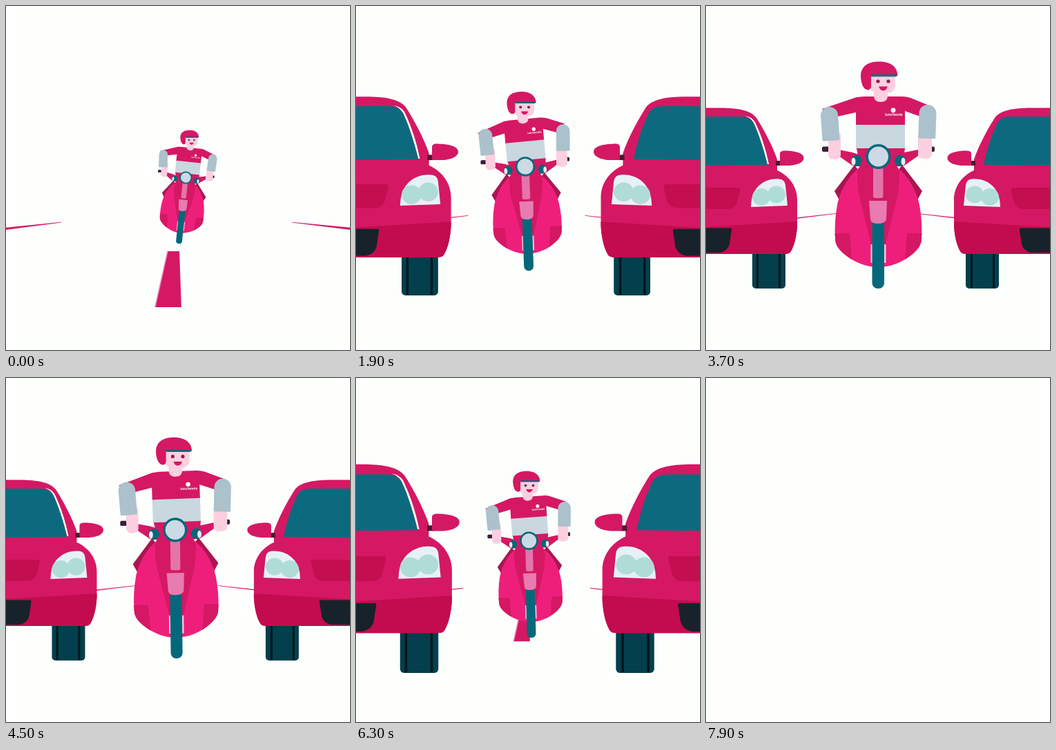
An HTML page with a canvas for the animation above (8 s loop, 498 px wide and 498 px high).

```html
<!DOCTYPE html>
<html lang="en">
<head>
<meta charset="utf-8">
<title>Scooter ride</title>
<style>
html, body { margin: 0; width: 100%; height: 100%; overflow: hidden; background: #fdfffc; }
canvas { display: block; width: 498px; height: 498px; }
</style>
</head>
<body>
<canvas id="stage" width="498" height="498"></canvas>
<script>
const ctx = document.getElementById('stage').getContext('2d');
const LOOP = 8000, STEP = 100, SPAN = 7860;
const PINK = '#d51863', HOT = '#ee1f7b', DEEP = '#c30c4f', TEAL = '#04687a', SKIN = '#fbcfe0';

// time, wheel x, wheel y, scale, tilt and rider's extra lean in degrees
const RIDE = [
  [0, 250, 344, .503, 6, 0],
  [1200, 258, 369, .7, 0, 0],
  [1560, 254, 376, .735, -1.6, -2.4],
  [2600, 244, 397, .902, -2.3, -3.4],
  [3700, 249, 409, 1, 0, 0],
  [3930, 250, 409, 1.004, .4, .4]
];
// time, left car x, right car x, y, scale
const CARS = [
  [300, -220, 720, 800, 1.9],
  [600, -45, 560, 640, 1.65],
  [900, 42, 472, 520, 1.4],
  [1200, 76.5, 432, 454, 1.245],
  [1560, 91.5, 404, 427, 1.155],
  [2600, 89.5, 400, 411, 1.015],
  [3700, 91, 400, 409, 1],
  [3930, 91, 400, 409, 1]
];
// time, reach of the road edge
const EDGE = [[0, 80], [1200, 147], [1560, 155], [2600, 177], [3700, 191], [3930, 194]];

// smooth curve through every column of the keys
function sample(keys, t) {
  const last = keys.length - 1;
  if (t <= keys[0][0]) return keys[0].slice(1);
  if (t >= keys[last][0]) return keys[last].slice(1);
  let i = 0;
  while (keys[i + 1][0] < t) i++;
  const a = keys[i], b = keys[i + 1], d = b[0] - a[0], u = (t - a[0]) / d;
  const slope = (k, c) => {
    const p = keys[Math.max(0, k - 1)], n = keys[Math.min(last, k + 1)];
    return (n[c] - p[c]) / (n[0] - p[0]);
  };
  return a.slice(1).map((v, j) => {
    const c = j + 1, w = 1 - u;
    return v * (1 + 2 * u) * w * w + b[c] * u * u * (3 - 2 * u)
      + d * u * w * (w * slope(i, c) - u * slope(i + 1, c));
  });
}

function shape(color, d) {
  ctx.fillStyle = color;
  ctx.fill(new Path2D(d));
}
function dot(color, x, y, rx, ry = rx) {
  ctx.fillStyle = color;
  ctx.beginPath();
  ctx.ellipse(x, y, rx, ry, 0, 0, 7);
  ctx.fill();
}
function box(color, x, y, w, h, r = 0) {
  ctx.fillStyle = color;
  ctx.beginPath();
  ctx.roundRect(x, y, w, h, r);
  ctx.fill();
}
function placed(x, y, sx, sy, deg, ox, oy, draw) {
  ctx.save();
  ctx.translate(x, y);
  ctx.rotate(deg * Math.PI / 180);
  ctx.scale(sx, sy);
  ctx.translate(-ox, -oy);
  draw();
  ctx.restore();
}
const turned = (x, y, deg, draw) => placed(x, y, 1, 1, deg, x, y, draw);
// draws a left half and its mirror image about the scooter's axis
function mirrored(draw) {
  for (const side of [1, -1]) placed(249.5, 0, side, 1, 0, 249.5, 0, draw);
}

function road(t) {
  const [tip] = sample(EDGE, t);
  const y = 322.5 - tip * .117;
  shape(PINK, `M0 320.8L${tip} ${y - .5}V${y + .3}L0 324Z`);
  shape(PINK, `M498 320.8L${494 - tip} ${y - .5}V${y + .3}L498 324Z`);

  // dashes recede towards the vanishing point
  for (let n = -1; n < 4; n++) {
    const near = .00685 + (t - n * 1385) * 2.35e-5, far = near + .00855;
    if (far <= .004) continue;
    const top = 290 + 1 / far, low = 290 + 1 / Math.max(near, .004);
    const left = y => 234 - (y - 355) * .224, right = y => 251 + (y - 355) * .035;
    shape(PINK, `M${left(top)} ${top}H${right(top)}L${right(low)} ${low}H${left(low)}Z`);
    ctx.strokeStyle = '#ec8db9';
    ctx.lineWidth = 1.5;
    ctx.beginPath();
    ctx.moveTo(left(top), top);
    ctx.lineTo(left(low), low);
    ctx.stroke();
  }
}

function car(glint) {
  for (const x of [67, -185]) {
    box('#033f4c', x, 345, 48, 64, 5);
    box('#01161c', x + 6, 345, 3, 63);
    box('#01161c', x + 38, 345, 3, 63);
  }
  shape(PINK, 'M-150 147.5H20C46 147.5 65 151 73 162C84 179 97 204 103 222V238C121 246 132 262 132 280V318C131 336 127 348 123 355Q121 359 114 359H-150Z');
  shape(DEEP, 'M-150 320H0L132 312V318C131 336 127 348 123 355Q121 359 114 359H-150Z');
  shape('#0d6a7e', 'M-150 160H50Q64 160 69 169C78 187 85 210 89 230L0 231H-150Z');
  if (glint) shape('#fdfffc', 'M56 159Q66 160 71 168C80 187 87 208 91 229L89 229C84 209 77 186 69 169Q64 161 56 159Z');
  box('#4a1a2e', 101, 224, 8, 7);
  shape(PINK, 'M107 213Q108 209 115 209.5C130 210 141.5 213 141.5 220C141.5 227 130 231 119 231H107Z');
  shape('#c30e50', 'M-60 263H48Q50 264 49 268L45 284Q42 294 30 294H-60Z');
  shape('#18222a', 'M-60 321.5H35Q38 321.5 37 325L34 345Q31 355 20 357H-60Z');

  shape('#e6f1f5', 'M65 291Q65 274 73 264C82 253 94 249.5 106 250.5Q114 251 115 259L118 289Z');
  dot('#b0dcd8', 80, 276.5, 13, 12.5);
  dot('#b0dcd8', 102, 273, 13, 12.5);
}

function scooter() {
  mirrored(() => {
    shape('#aa1650', 'M215 230L186 268L193 281L230 250Z');
    shape(HOT, 'M250 234H222C206 246 194 268 190 288C187 304 186 320 187 336C187 346 192 352 200 359C214 371 232 378 250 378Z');
    shape(PINK, 'M186.5 329H208L211 367Q205 363 200 359C192 352 187 346 187 336Z');
    shape(PINK, 'M250 226H225L219 240Q219 262 222 276L239 345H250Z');
    box('#f8c6db', 238.5, 345, 3, 27, 1);
  });
  box(TEAL, 240.5, 308, 17.5, 101, 8);
  box('#e475ab', 242, 230, 14.5, 48, 3);
  shape('#e87bb0', 'M236 282H262L261 309Q259 315 249 315Q239 315 238 309Z');
}

function head() {
  box(SKIN, 237, 94, 37, 32, [4, 4, 11, 11]);
  shape(PINK, 'M224 102C224 86 236 80.5 251 80.5C266 80.5 277 87 277.5 101H239V113Q240 121.5 234 121.5Q225 120 224 102Z');
  box(TEAL, 239, 99, 37, 3.2, 1);
  dot('#8e1c4c', 249, 109, 2.6);
  dot('#8e1c4c', 264, 109, 2.6);
  shape(PINK, 'M250 116.5H263Q261 122.5 256.5 122.5Q252 122.5 250 116.5Z');
}

function torso() {
  shape(PINK, 'M229 131H284Q290 131 296 133L328 146L313 161L288 152V174H217V154L181 162L168 149L218 132Z');
  box('#c9d7df', 217, 172, 71, 35);
  shape(PINK, 'M218 206H288L286 222H221Z');
  shape(SKIN, 'M243 119H263V131Q262 139 253 139Q244 139 243 131Z');

  // badge
  dot('#fff', 271, 151, 3.4);
  ctx.fillStyle = '#fff';
  ctx.font = 'bold 5px Inter, Arial, sans-serif';
  ctx.textAlign = 'center';
  ctx.fillText('lunchmole', 272, 159);
}

function bars() {
  mirrored(() => {
    shape(PINK, 'M192 208L212 212L234 219V234L212 231L192 217Z');
    box('#3a2038', 168, 203.5, 14, 7.5, 2);
    dot(TEAL, 218, 224, 8);
    dot('#e6f1f5', 213.5, 225, 3, 5.5);
  });
  dot(TEAL, 249.5, 218, 18);
  dot('#cbdae4', 249.5, 218, 14.5);
}

function arms() {
  box(SKIN, 177, 184, 18, 38, [2, 2, 7, 7]);
  box(SKIN, 307, 184, 20, 37, [2, 2, 7, 7]);
  for (const [x, y, deg] of [[179.5, 172, -4], [320.5, 169, 2]]) {
    placed(x, y, 1, 1, deg, 0, 0, () => box('#abc1cb', -12.5, -26, 25, 49, [13, 13, 2, 2]));
  }
}

function draw(ms) {
  const t = ms < SPAN / 2 ? ms : SPAN - ms;
  ctx.fillStyle = '#fdfffc';
  ctx.fillRect(0, 0, 498, 498);
  if (t < 0) return;
  road(t);

  const [lx, rx, cy, cs] = sample(CARS, t);
  placed(lx, cy, cs, cs, 0, 91, 409, () => car(true));
  placed(rx, cy, -cs, cs, 0, 91, 409, () => car(false));

  const [x, y, s, tilt, lean] = sample(RIDE, t);
  placed(x, y, s, s, tilt, 249, 409, () => {
    scooter();
    turned(252, 215, lean, () => {
      torso();
      // the head stays level
      turned(253, 126, -tilt - lean, head);
    });
    bars();
    arms();
  });
}

const start = performance.now();
function tick() {
  const ms = (performance.now() - start) % LOOP;
  draw(Math.floor(ms / STEP) * STEP);
  requestAnimationFrame(tick);
}
tick();
</script>
</body>
</html>
```
